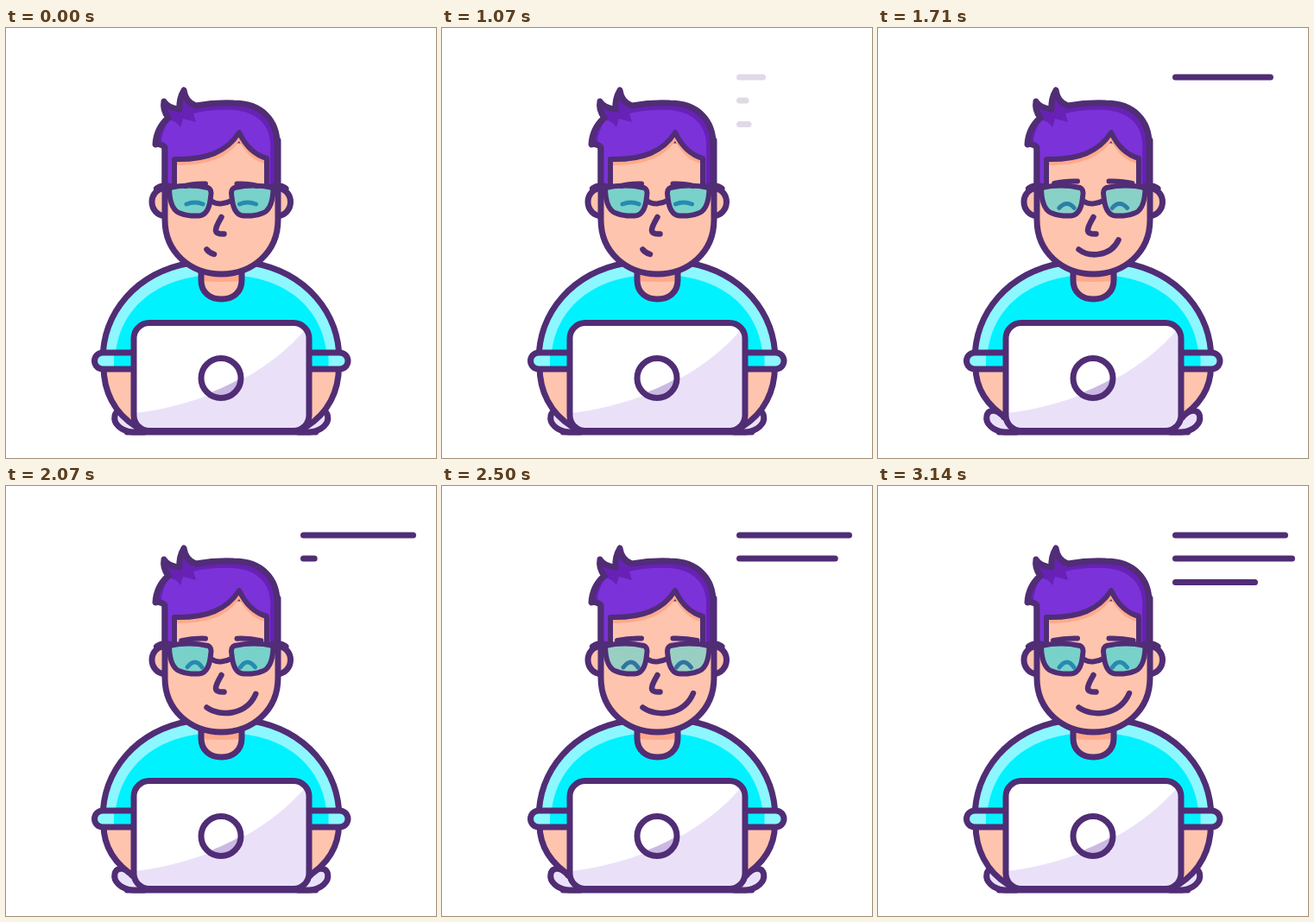
These frames come from a looping animation (498x498 px, 3570 ms). An HTML page with a canvas:

```html
<!DOCTYPE html>
<html lang="en">
<head>
<meta charset="utf-8">
<title>Typing at a laptop</title>
<style>
html, body { margin: 0; width: 100%; height: 100%; overflow: hidden; background: #fff; }
canvas { display: block; width: 100vw; height: 100vh; }
</style>
</head>
<body>
<canvas id="stage" width="498" height="498"></canvas>
<script>
const ctx = document.getElementById('stage').getContext('2d');
const LOOP = 3570, FPS = 14;
const INK = '#502d75', SKIN = '#ffc4ad', SKIN_SHADE = '#ffa98a';
const SHIRT = '#00f2ff', SHIRT_LIGHT = '#8df7ff';
const HAIR = '#7b32d9', HAIR_SHADE = '#6721b5', LILAC = '#eae1f9';

const clamp = v => Math.min(1, Math.max(0, v));
const span = (k, a, b) => clamp((k - a) / (b - a));
const smooth = u => u * u * (3 - 2 * u);
const lerp = (a, b, u) => a + (b - a) * u;

function shape(path, fill, width = 7, ink = INK) {
  const p = path instanceof Path2D ? path : new Path2D(path);
  if (fill) { ctx.fillStyle = fill; ctx.fill(p); }
  if (width) { ctx.lineWidth = width; ctx.strokeStyle = ink; ctx.stroke(p); }
}

function clipped(path, draw) {
  ctx.save();
  ctx.clip(new Path2D(path));
  draw();
  ctx.restore();
}

// Draws a left half, then its reflection about the body axis.
function both(draw) {
  draw();
  ctx.save();
  ctx.translate(498.5, 0);
  ctx.scale(-1, 1);
  draw();
  ctx.restore();
}

function roundRect(x, y, w, h, r) {
  const p = new Path2D();
  p.roundRect(x, y, w, h, r);
  return p;
}

const TORSO = 'M112 385C112 330 150 283 214 272H285C348 283 386 330 386 385Z';
const HEAD = 'M184 130V222C184 260 214 285 249.5 285S315 260 315 222V130Z';
const HAIR_PATH = 'M184 186V138Q179 133 173 135Q174 116 188 104Q181 95 183 85' +
  'Q188 93 201 94Q200 82 206 72Q208 86 220 90Q242 86 264 87C296 87 314 107 314 134V186' +
  'H302V151C288 147 278 138 270 121C256 143 233 153 195 152V186Z';
const HAIR_LINE = 'M184 184V138Q179 133 173 135Q174 116 188 104Q181 95 183 85' +
  'Q188 93 201 94Q200 82 206 72Q208 86 220 90Q242 86 264 87C296 87 314 107 314 134V184';
const FRINGE = 'M195 181V152C233 153 256 143 270 121C278 138 288 147 302 151V181';

function drawArm(raise) {
  shape('M160 468H147C133 467 124 458 126 449C128 440 140 442 146 451L160 458Z', LILAC);
  const dip = lerp(0, -9, raise);
  shape(`M113 392C113 ${420 + dip * .4} 125 ${446 + dip} 151 ${462 + dip}L160 392Z`, SKIN);
}

function drawBody(raise) {
  both(() => drawArm(raise));
  shape(TORSO, SHIRT_LIGHT, 0);
  clipped(TORSO, () =>
    shape('M126 390C126 334 164 294 226 287H273C335 294 372 334 372 390Z', SHIRT, 0));
  shape(TORSO);
  both(() => {
    const cuff = roundRect(102.5, 376, 60, 19, 9.5);
    shape(cuff, SHIRT_LIGHT, 0);
    ctx.fillStyle = SHIRT;
    ctx.fillRect(125, 377, 30, 17);
    shape(cuff);
  });
  const neck = 'M226 278V292C226 307 237 314 249.5 314S273 307 273 292V278Z';
  shape(neck, SKIN, 0);
  clipped(neck, () => shape('M220 275H280V292Q249 296 220 292Z', SKIN_SHADE, 0));
  shape(neck);
}

function drawLaptop() {
  const lid = roundRect(148, 341.5, 203, 125, 18);
  shape(lid, '#fff', 0);
  ctx.save();
  ctx.clip(lid);
  shape('M148 446C225 438 304 402 351 344V470H148Z', LILAC, 0);
  ctx.restore();
  shape('M140 468.5H359', null, 6);
  shape(lid);
  const ring = new Path2D();
  ring.arc(249, 405.5, 23, 0, Math.PI * 2);
  shape(ring, '#fff', 0);
  ctx.save();
  ctx.clip(ring);
  shape('M222 427Q252 418 276 403V432H222Z', '#cbb9e4', 0);
  ctx.restore();
  shape(ring);
}

function drawHair() {
  shape('M195 152C233 153 256 143 270 121C278 138 288 147 302 151V158C288 154 278 146 270 131C256 151 234 159 195 159Z', SKIN_SHADE, 0);
  shape(HAIR_PATH, HAIR, 0);
  clipped(HAIR_PATH, () => {
    shape('M170 140V80L206 68L222 88Q300 78 318 115V190H306V132C304 108 286 96 262 95' +
      'Q238 94 217 99L220 109L205 105L202 115Q196 106 189 107Q180 120 180 133Z', HAIR_SHADE, 0);
  });
  shape(HAIR_LINE);
  shape(FRINGE, null, 6);
}

function drawGlasses(tint) {
  const lens = 'M189 185Q212 180 234 185Q239 187 237 196Q235 217 223 217.5Q210 218 203 215Q190 212 189 187Z';
  both(() => {
    ctx.globalAlpha = tint;
    shape(lens, '#00dfe4', 0);
    ctx.globalAlpha = 1;
    shape(lens, null, 6);
    shape('M175 186Q181 182 190 184', null, 8);
  });
  shape('M237 200Q243 204 249 203.5T261 200', null, 6);
}

function drawFace(mood, tint) {
  both(() => {
    const ear = new Path2D();
    ear.ellipse(184, 201.5, 15, 16, 0, 0, Math.PI * 2);
    shape(ear, SKIN);
  });
  shape(HEAD, SKIN);
  drawHair();

  const ends = lerp(204, 210, mood), peak = lerp(200, 198, mood), inset = lerp(0, 1, mood);
  both(() => shape(`M${209 + inset} ${ends}Q219 ${peak} ${228 - inset} ${ends}`, null, 5));
  drawGlasses(tint);

  const lift = lerp(4, 0, mood);
  both(() => shape(`M${lerp(208, 203, mood)} ${179 + lift}Q216 ${176 + lift} 231 ${176.5 + lift}`, null, 6));
  shape('M249.5 219C246 225 243 230 243 234Q243 239 252.5 238.5', null, 6.5);

  const at = (x0, y0, x1, y1) => `${lerp(x0, x1, mood)} ${lerp(y0, y1, mood)} `;
  shape('M232.5 256.5C' + at(235, 260, 248, 268) + at(238, 261, 280, 266) + at(241, 262, 291, 240), null, 6.5);
}

const ROWS = [
  { y: 57, stub: 371.5, end: 471.5, from: 16.3, to: 26.3 },
  { y: 84, stub: 352, end: 479.5, from: 26.9, to: 38 },
  { y: 111.5, stub: 355, end: 436.5, from: 35.6, to: 44 }
];

function stubAlpha(k) {
  if (k < 8) return Math.min(span(k, 0, 3), 1 - span(k, 4, 7));
  return Math.min(span(k, 8, 11), 1 - span(k, 12.5, 15.5) * .99) * (k < 16 ? 1 : 0);
}

function drawRows(k) {
  const fade = stubAlpha(k);
  for (const row of ROWS) {
    const grown = smooth(span(k, row.from, row.to));
    const right = grown > 0 ? lerp(344.5, row.end, grown) : row.stub;
    ctx.globalAlpha = grown > 0 ? 1 : fade;
    if (ctx.globalAlpha > 0) shape(`M344.5 ${row.y}H${right}`);
  }
  ctx.globalAlpha = 1;
}

function render(time) {
  const k = Math.floor(((time % LOOP) + 5) * FPS / 1000) % 50;
  const typing = k >= 16 && k < 44;
  const raise = typing ? (1 + Math.cos(2 * Math.PI * (k - 24) / 5.5)) / 2 : 0;
  const glow = typing ? Math.sin(Math.PI * (k - 29) / 4) ** 2 : 0;
  const mood = 1 - (1 - span(k, 16, 32)) ** 2;

  ctx.fillStyle = '#fff';
  ctx.fillRect(0, 0, 498, 498);
  ctx.lineCap = ctx.lineJoin = 'round';
  drawBody(raise);
  drawFace(mood, .53 - .13 * glow);
  drawLaptop();
  drawRows(k);
}

const start = performance.now();
function loop() {
  render(performance.now() - start);
  requestAnimationFrame(loop);
}
loop();
</script>
</body>
</html>
```
